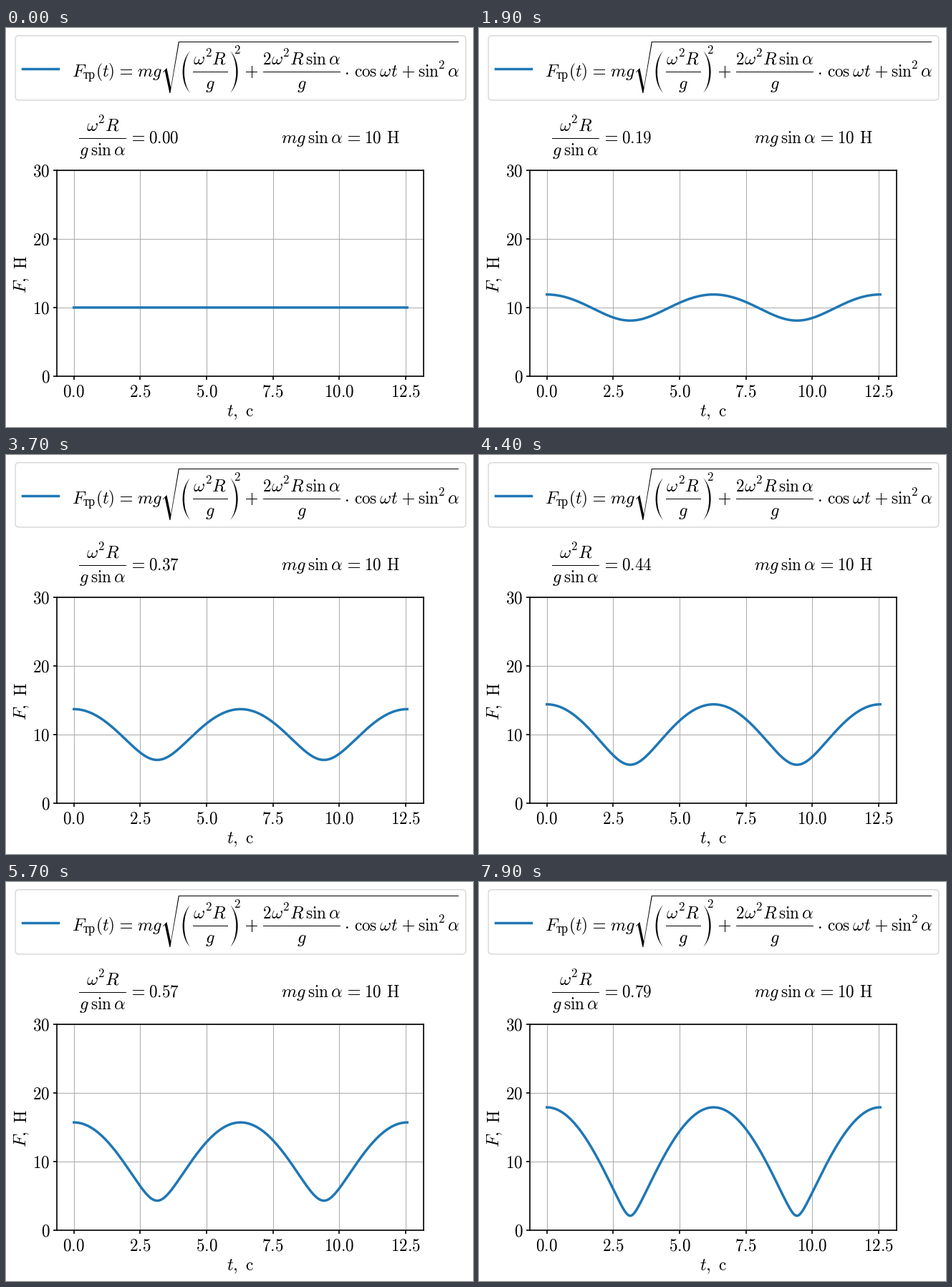
Write a matplotlib script that moves like this. It is 652 px wide and 558 px high and loops after 8000 ms.

```python
import numpy as np
import matplotlib.pyplot as plt
from matplotlib.animation import FuncAnimation
from matplotlib.patches import FancyBboxPatch, PathPatch, Polygon, Rectangle
from matplotlib.path import Path

plt.rcParams["mathtext.fontset"] = "cm"

W, H, DPI = 652, 558, 100
FRAMES, STEP_MS = 80, 100
BLUE = "#1f77b4"
MATH, ROMAN, SUP = 17.6, 16.7, 12.2   # font sizes in points

fig = plt.figure(figsize=(W / DPI + 1e-9, H / DPI + 1e-9), dpi=DPI, facecolor="white")

# Plot area, placed in pixels
LEFT, TOP, WIDTH, HEIGHT = 71.48, 198.93, 512, 288
ax = fig.add_axes([LEFT / W, 1 - (TOP + HEIGHT) / H, WIDTH / W, HEIGHT / H])
t = np.linspace(0, 4 * np.pi, 500)
pad = 0.05 * t[-1]
ax.set_xlim(-pad, t[-1] + pad)
ax.set_ylim(0, 30)
xticks, yticks = np.arange(0, 12.6, 2.5), np.arange(0, 31, 10)
ax.set_xticks(xticks)
ax.set_yticks(yticks)
ax.tick_params(labelbottom=False, labelleft=False, width=1.2, length=3.5)
ax.grid(color="#b0b0b0", lw=0.8)
for spine in ax.spines.values():
    spine.set_linewidth(1.2)
curve, = ax.plot(t, np.full_like(t, 10), color=BLUE, lw=2.5, snap=False)

# Page layer: pixel coordinates, y pointing down
page = fig.add_axes([0, 0, 1, 1], facecolor="none")
page.set_xlim(0, W)
page.set_ylim(H, 0)
page.axis("off")


def put(x, y, tex, size=MATH, ha="left", **kw):
    # Mathtext leaves one blank pixel before the first glyph
    dx = -1 if ha == "left" else 0
    return page.text(x + dx, y - 0.3, f"${tex}$", fontsize=size, ha=ha,
                     va="baseline", **kw)


def roman(x, y, s, size=ROMAN, **kw):
    return put(x, y, rf"\mathrm{{{s}}}", size, **kw)


def bar(x, y, w, h=1):
    page.add_patch(Rectangle((x, y), w, h, fc="black", lw=0))


def equals(x, base):
    bar(x + 1, base - 4, 16)
    bar(x + 1, base - 10, 16)


def plus(x, base):
    bar(x + 1, base - 7, 16)
    bar(x + 8.6, base - 15, 1, 17)


def omega2_r(x, base):
    put(x, base, r"\omega")
    roman(x + 16.5, base - 10.3, "2", SUP)
    put(x + 26, base, "R")


def sin_alpha(x, base):
    roman(x, base, "sin")
    put(x + 32, base, r"\alpha")


def paren(tip, mid, y=61.5, h=29.8):
    """Tall parenthesis: an outer arc down and a flatter inner arc back."""
    d = tip - mid
    inner = mid + 0.22 * d

    def arc(m, s):
        near, far = tip - 0.62 * d + (m - mid) * 0.5, s * h
        return [(near, y + far * 0.76), (m, y + far * 0.42), (m, y),
                (m, y - far * 0.42), (near, y - far * 0.76), (tip, y - far)]

    pts = [(tip, y - h)] + arc(mid, -1) + arc(inner, 1)
    codes = [Path.MOVETO] + [Path.CURVE4] * 12
    page.add_patch(PathPatch(Path(pts, codes), fc="black", lw=0))


# Legend frame and key
page.add_patch(FancyBboxPatch((13.1, 10.7), 628.8, 90.2,
                              boxstyle="round,pad=0,rounding_size=5",
                              fc="white", ec="0.8", lw=1, alpha=0.8))
page.plot([23.1, 73.1], [57.3, 57.3], color=BLUE, lw=2.5,
          solid_capstyle="projecting")

# Legend formula
B = 68
put(92.8, B, "F")
page.text(108, B + 3.4, "тр", fontsize=13, family="Liberation Serif", va="baseline")
roman(125.6, B, "(")
put(134.6, B, "t")
roman(143.4, B, ")")
equals(158.9, B)
put(183.7, B, "mg")

page.add_patch(Polygon([(219.1, 61.5), (224.4, 56), (230.1, 83.5), (240.8, 19),
                        (242, 19), (229.4, 91), (228.4, 91), (221.7, 59.8),
                        (219.8, 62.2)], fc="black", lw=0))
bar(241, 19, 391)

paren(257.3, 246.6)
omega2_r(262.3, B - 17)
bar(261, 61, 49)
put(279, B + 17, "g")
paren(312.9, 323.6)
roman(318.6, 36.7, "2", SUP)

plus(334, B)
roman(358.7, B - 17, "2")
omega2_r(370.5, B - 17)
sin_alpha(419.3, B - 17)
bar(359, 61, 108)
put(407, B + 17, "g")
put(473, B, r"\cdot")
roman(486.5, B, "cos")
put(521.8, B, r"\omega")
put(537.8, B, "t")
plus(552.5, B)
roman(575.6, B, "sin")
roman(604.3, B - 10.3, "2", SUP)
put(616.7, B, r"\alpha")

# Parameter line
P = 161
omega2_r(112.5, P - 17)
bar(102, 154, 66)
put(103, P + 17, "g")
sin_alpha(118.7, P + 17)
equals(175.6, P)
value = roman(200.3, P, "0.00")

put(385, P, "mg")
sin_alpha(422.2, P)
equals(476.7, P)
roman(501.4, P, "10")
roman(532.3, P, "H")

# Axis labels
for v in xticks:
    x = LEFT + WIDTH * (v + pad) / (t[-1] + 2 * pad)
    roman(x, 515.3, f"{v:.1f}", ha="center")
for v in yticks:
    y = TOP + HEIGHT * (1 - v / 30)
    roman(61.4 - 11.5 * len(str(v)), y + 8.5, f"{v}")

put(308.5, 543.3, "t,")
roman(335.3, 543.3, "c")
upright = dict(rotation=90, rotation_mode="anchor")
put(29.5, 370.8, "F,", **upright)
roman(29.5, 336.8, "H", **upright)


def update(i):
    k = i / 100
    curve.set_ydata(10 * np.sqrt(k * k + 2 * k * np.cos(t) + 1))
    value.set_text(rf"$\mathrm{{{k:.2f}}}$")
    return curve, value


anim = FuncAnimation(fig, update, frames=FRAMES, interval=STEP_MS,
                     repeat=True, repeat_delay=0, blit=False)
plt.show()
```
